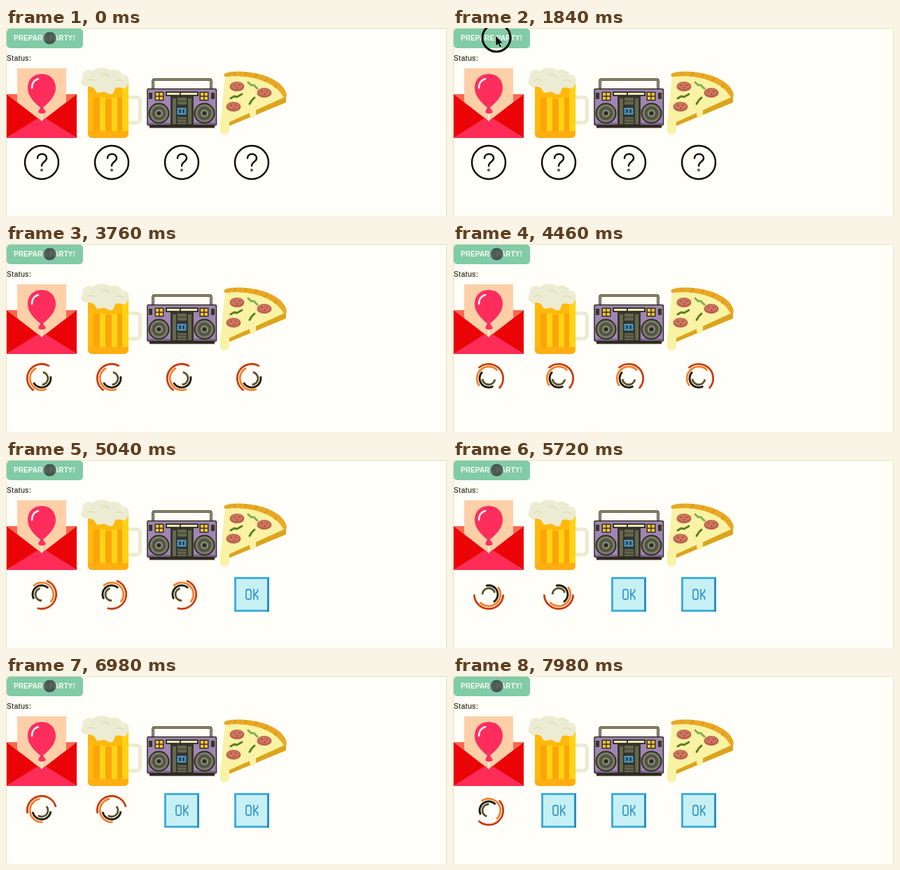
An HTML page for the animation above (8000 ms loop, 630x270 px).

```html
<!DOCTYPE html>
<html lang="en">
<head>
<meta charset="utf-8">
<title>Prepare party</title>
<style>
  html, body { margin: 0; width: 630px; height: 270px; overflow: hidden; background: #fffef8; }
  svg { display: block; }
  text { font-family: "Liberation Sans", Arial, sans-serif; font-size: 10px; }
  .label { font-weight: bold; letter-spacing: .08px; fill: #f6fcf6; }
  .status { letter-spacing: .6px; fill: #25250f; stroke: #25250f; stroke-width: .2px; }
  .line { fill: none; stroke-linecap: round; stroke-linejoin: round; }
</style>
</head>
<body>
<svg width="630" height="270" viewBox="0 0 630 270">
  <defs>
    <g id="ask" class="line" stroke="#0c0c08" stroke-width="2.5">
      <circle r="24"/>
      <path d="M-6-6C-6-14 7-14 7-6C7-1 0-1 0 5"/>
      <circle cy="11" r=".6"/>
    </g>
    <g id="ok">
      <path fill="#42afdc" d="M-25-25H25V25H-25z"/>
      <path fill="#2c8fc2" d="M25-25V25H22V-22z"/>
      <path fill="#c6f0f3" d="M-22-22H22V22H-22z"/>
      <g class="line" stroke="#3e9ccc" stroke-width="1.8">
        <rect x="-8" y="-7" width="7" height="14" rx="2.5"/>
        <path d="M3-7V7M8.500-7V-4L4 0L8.500 4V7"/>
      </g>
    </g>
    <g id="speaker">
      <circle r="15" fill="#2f2d22"/>
      <circle r="13" fill="#7b7d69"/>
      <circle r="10" fill="#525543"/>
      <circle r="5.500" fill="#8a8d78"/>
      <circle r="3" fill="#2b2b22"/>
    </g>
    <g id="lights">
      <path fill="#3a3020" d="M-6.500-6.500H6.500V6.500H-6.500z"/>
      <path fill="#f2c43a" d="M-5-5H-.7V-.7H-5zM.7-5H5V-.7H.7zM-5 .7H-.7V5H-5zM.7.7H5V5H.7z"/>
    </g>
    <g id="salami">
      <ellipse rx="10.500" ry="7" fill="#bd5f4b"/>
      <ellipse cy="-.8" rx="8.500" ry="5" fill="#cb7660"/>
      <path class="line" stroke="#a5493a" stroke-width="1.800" d="M-4-2h1M3-2h1M0 2h1"/>
    </g>
  </defs>

  <path fill="none" stroke="#e2e2b8" d="M.5 270V.5H629.5V270"/>

  <rect x="1" y="1" width="109" height="28" rx="5" fill="#81cba6"/>
  <text class="label" x="11" y="18">PREPARE PARTY!</text>
  <circle id="spot" cx="62.500" cy="14.500" r="9.500" fill="#333" fill-opacity=".74" stroke="#b0dcc4" stroke-opacity=".7"/>
  <g id="click">
    <circle id="ring" cx="62" cy="14" r="20" fill="none" stroke="#080808" stroke-width="3"/>
    <path d="M61 11V26L64.5 23L67 28L69.5 27L67 22H71.5z" fill="#080808" stroke="#e8f5ea" stroke-width=".6"/>
  </g>
  <text class="status" x="1" y="47">Status:</text>

  <!-- invitation -->
  <g>
    <path fill="#fa684e" d="M1 95H101L51 134z"/>
    <path fill="#ffcfa8" d="M16 58H86V107L51 134L16 107z"/>
    <path class="line" stroke="#fff0cc" stroke-width="2" d="M51 123V133"/>
    <path fill="#ff2d5c" d="M51 66C64 66 71 75 71 86C71 99 59 109 53 114L57 121Q51 125 46 121L49 114C43 109 31 99 31 86C31 75 38 66 51 66z"/>
    <path class="line" stroke="#fff" stroke-width="2.500" d="M37 86Q37 76 46 73"/>
    <path fill="#ea0408" d="M1 95L46 130L1 158zM101 95L56 130L101 158z"/>
    <path fill="#ff2c58" d="M1 158L46 129L51 134L56 129L101 158z"/>
  </g>

  <!-- beer -->
  <g>
    <path class="line" stroke="#ebebd0" stroke-width="5" d="M176 99.500H186Q191.500 99.500 191.500 105V130Q191.500 136 185 136H176"/>
    <path fill="#ffb80c" d="M117 76H175V151Q175 158 168 158H124Q117 158 117 151z"/>
    <path fill="#ffd314" d="M134 100H142V148H134zM151 100H159V148H151zM166 84H175V148H166z"/>
    <path fill="#fca40a" d="M125 100H134V148H125zM142 102H151V148H142zM159 100H166V148H159z"/>
    <path fill="#ffae12" d="M117 148H175V151Q175 158 168 158H124Q117 158 117 151z"/>
    <path fill="#ececd2" d="M117 84C107 86 105 75 110 71C107 63 116 58 124 62C130 56 144 56 148 61C156 57 166 62 166 67C175 66 178 75 174 82Q171 88 165 86Q157 84 155 88Q154 97 147 95Q141 90 136 92Q130 96 127 88Q124 84 117 84z"/>
    <path class="line" stroke="#dcdcbc" stroke-width="1.500" d="M117 75Q122 72 126 76M137 68Q143 64 148 70M157 76Q163 72 168 77"/>
  </g>

  <!-- boombox -->
  <g>
    <path class="line" stroke="#3b3826" stroke-width="3.600" d="M210 87V76Q210 74 212 74H291Q293 74 293 76V87"/>
    <path class="line" stroke="#c9c6a0" stroke-width="1.200" d="M210 87V76Q210 74 212 74H291Q293 74 293 76V87"/>
    <path fill="#2f291f" d="M205 139H298V143.500H205z"/>
    <rect x="202" y="87.500" width="98.500" height="52" rx="1.500" fill="#9f86b4" stroke="#2f291f" stroke-width="1.500"/>
    <path fill="#7b648f" d="M203 136H300V139H203z"/>
    <path fill="#38352a" d="M228 91H275V98H228zM235 98H268V139H235zM204 93H209V102H204zM293 93H298V102H293z"/>
    <path fill="#ece6b8" d="M230 93H248V96H230zM250 93H273V96H250z"/>
    <path fill="#64684f" d="M238 101H243V138H238zM260 101H265V138H260zM245 100H258V110H245zM245 128H258V138H245z"/>
    <path stroke="#38352a" d="M245 105H258M245 131H258M245 135H258"/>
    <rect x="244" y="114" width="14" height="11" fill="#4f94bd" stroke="#1f292c"/>
    <path fill="#28414e" d="M247 117H250V122H247zM252 117H255V122H252z"/>
    <use href="#speaker" x="218.500" y="122.500"/>
    <use href="#speaker" x="283.500" y="122.500"/>
    <use href="#lights" x="219" y="98"/>
    <use href="#lights" x="283" y="98"/>
  </g>

  <!-- pizza -->
  <g>
    <path fill="#dba51c" d="M318 135L400 98V107L318 141z"/>
    <path fill="#faf2a4" d="M313 68C345 65 381 70 398 99L357 118V126Q353 132 348 126V122L319 135V149Q312 157 306 149V137z"/>
    <path fill="#e9a824" d="M312 66Q316 62 335 62.500C374 64 400 80 401 97Q400 102 397 100C385 76 347 66 314 70Q310 69 312 66z"/>
    <path class="line" stroke="#d08c1c" stroke-width="1.500" d="M327 64V67M343 64L342 67M358 67L356 70M373 73L370 76M387 82L384 85"/>
    <use href="#salami" x="330" y="84"/>
    <use href="#salami" x="369" y="93"/>
    <use href="#salami" x="325" y="113"/>
    <g class="line" stroke-width="3">
      <path stroke="#7fb04d" d="M346 78L350 82L354 82L359 87"/>
      <path stroke="#557f23" d="M321 101L326 98L330 99L337 95M348 109L351 104L355 100"/>
    </g>
  </g>

  <g id="slots"></g>
</svg>
<script>
  const NS = "http://www.w3.org/2000/svg";
  const LOOP = 8000, START = 2100;
  const doneAt = [Infinity, 7120, 5440, 4500];
  const times = [2100, 2960, 4460, 5720, 6980, 7960];

  // Each arc: radius, colour, span, and its middle angle at the times above.
  const arcs = [
    [20.7, "#c93d0c", 178, [-30, 92, 318, 450, 620, 765]],
    [16.8, "#f7802a", 176, [-58, 65, 231, 410, 535, 680]],
    [13, "#1f1c0c", 165, [-138, -16, 145, 335, 450, 595]],
    [9, "#575129", 165, [-225, -100, 95, 262, 405, 550]]
  ];

  const byId = id => document.getElementById(id);
  const show = (el, on) => el.setAttribute("visibility", on ? "visible" : "hidden");

  function add(parent, tag, attrs) {
    const el = document.createElementNS(NS, tag);
    for (const key in attrs) el.setAttribute(key, attrs[key]);
    return parent.appendChild(el);
  }

  function arcPath(r, span) {
    const a = span * Math.PI / 360, x = r * Math.cos(a), y = r * Math.sin(a);
    return `M${x} ${-y}A${r} ${r} 0 0 1 ${x} ${y}`;
  }

  const slots = doneAt.map((done, i) => {
    const g = add(byId("slots"), "g", { transform: `translate(${51 + 100 * i} 193)` });
    const ask = add(g, "use", { href: "#ask" });
    const ok = add(g, "use", { href: "#ok" });
    const spin = add(g, "g", { fill: "none", "stroke-width": 2.8 });
    const rings = arcs.map(([r, stroke, span]) => add(spin, "path", { d: arcPath(r, span), stroke }));
    return { done, ask, ok, spin, rings };
  });

  // The spinner moves in 40 ms steps and rests briefly every 840 ms.
  function stepTime(t) {
    const g = (t - 2080) % 840;
    return t - g + Math.floor(Math.min(g, 740) / 40) * 40;
  }

  function angleAt(t, values) {
    let i = 0;
    while (i < times.length - 2 && t >= times[i + 1]) i++;
    const p = (t - times[i]) / (times[i + 1] - times[i]);
    return values[i] + p * (values[i + 1] - values[i]);
  }

  function draw(t) {
    const clicking = t >= 1840 && t < 1960;
    show(byId("spot"), !clicking);
    show(byId("click"), clicking);
    byId("ring").setAttribute("r", t < 1940 ? 20 : 14);

    const angles = arcs.map(arc => angleAt(stepTime(t), arc[3]));
    for (const { done, ask, ok, spin, rings } of slots) {
      show(ask, t < START);
      show(ok, t >= done);
      show(spin, t >= START && t < done);
      rings.forEach((ring, i) => ring.setAttribute("transform", `rotate(${angles[i]})`));
    }
  }

  const origin = performance.now();
  function tick() {
    draw((performance.now() - origin) % LOOP);
    requestAnimationFrame(tick);
  }
  tick();
</script>
</body>
</html>
```
